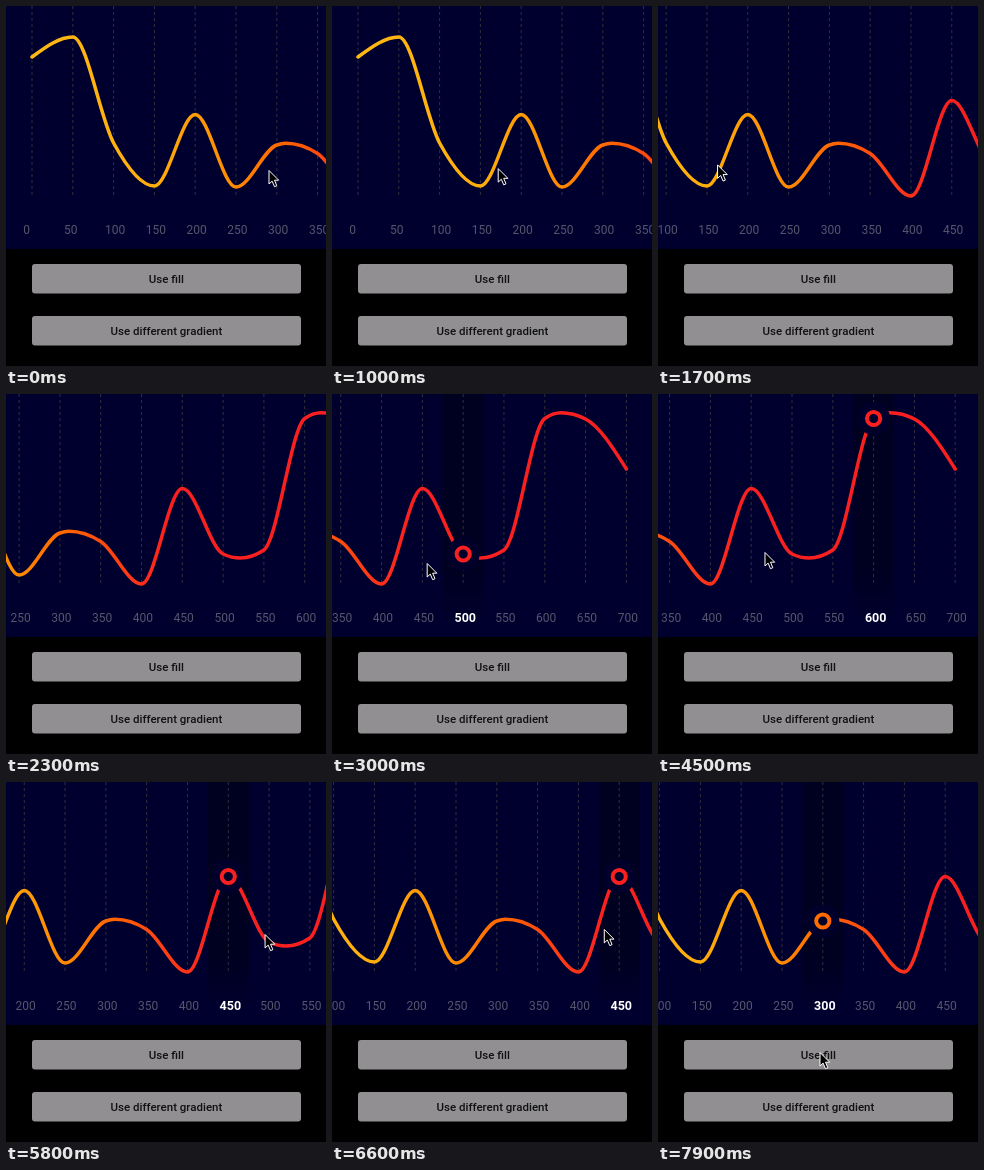
An HTML page for the animation above (8000 ms loop, 320 by 360 pixels).

```html
<!DOCTYPE html>
<html lang="en">
<head>
<meta charset="utf-8">
<title>Scrolling line chart</title>
<style>
  html, body { margin: 0; width: 100%; height: 100%; overflow: hidden; background: #000; }
  svg { display: block; width: 320px; height: 360px; font-family: Roboto, "Liberation Sans", sans-serif; }
  .grid { stroke: #30303a; stroke-width: 1; stroke-dasharray: 3 3; }
  .label { font-size: 12px; fill: #55556c; }
  .label.on { font-size: 12.5px; font-weight: 700; fill: #fff; }
  .button rect { fill: #918f92; }
  .button text { font-size: 11.5px; font-weight: 500; fill: #111; text-anchor: middle; }
</style>
</head>
<body>
<svg viewBox="0 0 320 360">
  <defs>
    <linearGradient id="heat" gradientUnits="userSpaceOnUse" x1="0" y1="0" x2="400" y2="0">
      <stop offset=".06" stop-color="#ffb914"/>
      <stop offset=".37" stop-color="#ffae0c"/>
      <stop offset=".57" stop-color="#ff8a00"/>
      <stop offset=".69" stop-color="#ff6600"/>
      <stop offset=".8" stop-color="#ff4512"/>
      <stop offset=".95" stop-color="#fb2020"/>
    </linearGradient>
    <linearGradient id="shade" x1="0" y1="0" x2="0" y2="1">
      <stop offset=".75" stop-color="#000020"/>
      <stop offset="1" stop-color="#000020" stop-opacity="0"/>
    </linearGradient>
  </defs>

  <rect width="320" height="243" fill="#00002e"/>
  <g id="chart">
    <rect id="band" width="41" height="228" fill="url(#shade)"/>
    <g id="axis"></g>
    <path id="line" fill="none" stroke="url(#heat)" stroke-width="3.5" stroke-linecap="round"/>
    <circle id="halo" r="16.5" fill="#00002b"/>
    <circle id="ring" r="6.6" fill="none" stroke="url(#heat)" stroke-width="4"/>
  </g>

  <g class="button">
    <rect x="26" y="258" width="269" height="29.5" rx="3"/>
    <text x="160.4" y="277">Use fill</text>
  </g>
  <g class="button">
    <rect x="26" y="310" width="269" height="29.5" rx="3"/>
    <text x="160.4" y="329">Use different gradient</text>
  </g>

  <path id="cursor" d="M0 .5V14L3.1 11.1L5.5 16.7L7.8 15.7L5.5 10.2H9.7Z"
        fill="#000" stroke="#fff" stroke-linejoin="round"/>
</svg>

<script>
const LOOP = 8000, STEP = 40.8;
const el = id => document.getElementById(id);
const xAt = value => 26 + value / 50 * STEP;

// Line height at every 50 units, and the turning points between them.
const heights = [51, 31, 137, 180, 108.5, 181, 139, 147.5, 190, 94.5, 160, 156, 24.5, 25, 75];
const turns = [[311, 137.3], [521, 164], [620, 18.7]];

// Monotone cubic through the points.
function curvePath(p) {
  const n = p.length - 1;
  const h = i => p[i + 1][0] - p[i][0];
  const s = i => (p[i + 1][1] - p[i][1]) / h(i);
  const m = p.map((_, i) => {
    if (i === 0 || i === n) return 0;
    const a = s(i - 1), b = s(i);
    const mean = (a * h(i) + b * h(i - 1)) / (h(i - 1) + h(i));
    return (Math.sign(a) + Math.sign(b)) * Math.min(Math.abs(a), Math.abs(b), Math.abs(mean) / 2);
  });
  m[0] = (3 * s(0) - m[1]) / 2;
  m[n] = (3 * s(n - 1) - m[n - 1]) / 2;

  let d = `M${p[0]}`;
  for (let i = 0; i < n; i++) {
    const [x0, y0] = p[i], [x1, y1] = p[i + 1], k = h(i) / 3;
    d += `C${x0 + k} ${y0 + k * m[i]} ${x1 - k} ${y1 - k * m[i + 1]} ${x1} ${y1}`;
  }
  return d;
}

function add(tag, attrs) {
  const node = document.createElementNS("http://www.w3.org/2000/svg", tag);
  for (const k in attrs) node.setAttribute(k, attrs[k]);
  return el("axis").appendChild(node);
}

const points = heights.map((y, i) => [i * 50, y]).concat(turns).sort((a, b) => a[0] - b[0]);
el("line").setAttribute("d", curvePath(points.map(([v, y]) => [xAt(v), y])));

const labels = heights.map((_, i) => {
  const x = xAt(i * 50);
  add("line", { class: "grid", x1: x, x2: x, y1: 0, y2: 191 });
  const label = add("text", { class: "label", x: x - 8.7, y: 228 });
  label.textContent = i * 50;
  return label;
});

// The pointer's script: glide moves it, drag also pulls the chart, tap picks a value.
const linear = u => u;
const smooth = u => u * u * (3 - 2 * u);
const easeOut = u => u * (2 - u);
const script = [{ at: 0, x: 263, y: 164, scroll: 0, pick: null }];
const last = () => script[script.length - 1];
const glide = (at, x, y) => script.push({ ...last(), at, x, y, ease: smooth });
const drag = (at, x, y, ease) =>
  script.push({ ...last(), at, x, y, scroll: last().scroll + last().x - x, ease });
const tap = value => { last().pick = value; };

glide(1193, 159, 162);
drag(2741, -144, 151, linear);
glide(2950, 95, 169);
tap(500);
drag(3300, 98, 169, smooth);
glide(3900, 216, 120);
tap(600);
glide(4500, 107, 158);
glide(5000, 95, 150);
tap(450);
glide(5350, 130, 150);
drag(6420, 324, 153, easeOut);
glide(6900, 162, 134);
tap(300);
glide(7150, 114, 145);
glide(7850, 162, 270);
glide(LOOP, 162, 270);

let picked;
function select(value) {
  if (value === picked) return;
  picked = value;
  const on = value !== null, i = value / 50;
  labels.forEach((label, j) => label.classList.toggle("on", on && i === j));
  for (const id of ["band", "halo", "ring"]) el(id).style.display = on ? "" : "none";
  if (!on) return;
  el("band").setAttribute("x", xAt(value) - 20.5);
  for (const id of ["halo", "ring"]) {
    el(id).setAttribute("cx", xAt(value));
    el(id).setAttribute("cy", heights[i]);
  }
}

function draw() {
  const t = performance.now() % LOOP;
  const i = script.findIndex(s => s.at > t);
  const from = script[i - 1], to = script[i];
  const u = to.ease((t - from.at) / (to.at - from.at));
  const mix = key => from[key] + (to[key] - from[key]) * u;
  el("chart").setAttribute("transform", `translate(${-mix("scroll")} 0)`);
  el("cursor").setAttribute("transform", `translate(${mix("x")} ${mix("y")})`);
  select(from.pick);
  requestAnimationFrame(draw);
}
draw();
</script>
</body>
</html>
```
